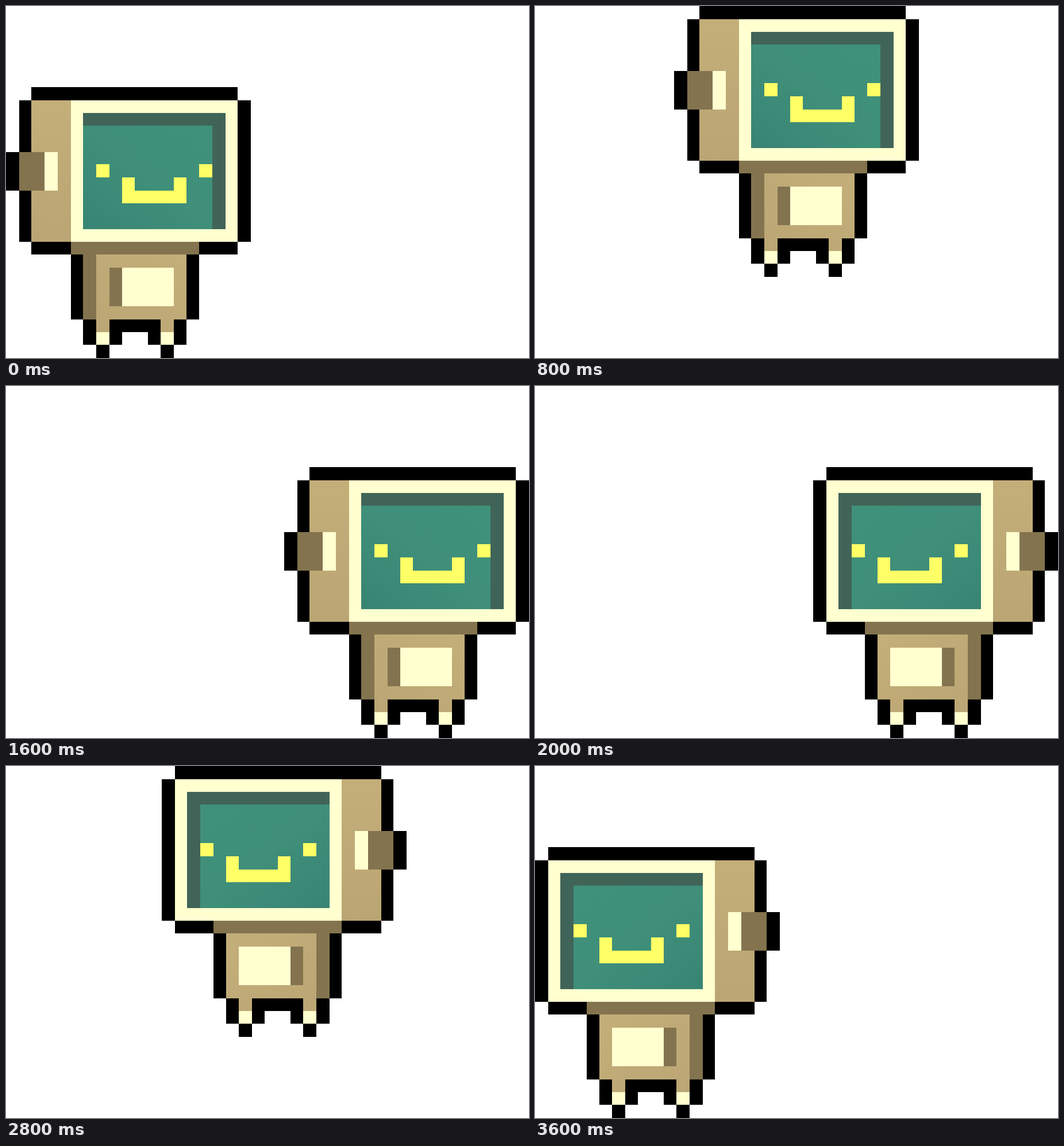
Write an HTML page without scripts that moves like this. It is 910 px wide and 612 px high and loops after 4000 ms.

```html
<!DOCTYPE html>
<html lang="en">
<head>
<meta charset="utf-8">
<title>Hopping pixel robot</title>
<style>
  html, body {
    margin: 0;
    width: 100%;
    height: 100%;
    overflow: hidden;
    background: #fff;
  }
  .robot {
    position: absolute;
    left: 0;
    top: 0;
    width: 426px;
    height: 471px;
    shape-rendering: crispEdges;
    animation: hop 4s step-end infinite;
  }
  .cream { fill: #ffffcf; }
  .brown { fill: #83744f; }
  .shade { fill: #416458; }
  .yellow { fill: #ffff66; }

  /* Two hops right, turn around, two hops back */
  @keyframes hop {
    0%   { transform: translate(0, 141px); }
    10%  { transform: translate(118px, 71px); }
    20%  { transform: translate(242px, 0); }
    30%  { transform: translate(403px, 71px); }
    40%  { transform: translate(484px, 141px); }
    50%  { transform: translate(484px, 141px) scaleX(-1); }
    60%  { transform: translate(426px, 71px) scaleX(-1); }
    70%  { transform: translate(271px, 0) scaleX(-1); }
    80%  { transform: translate(118px, 70px) scaleX(-1); }
    90%, 100% { transform: translate(0, 141px) scaleX(-1); }
  }
</style>
</head>
<body>
<svg class="robot" viewBox="0 0 426 471">
  <defs>
    <linearGradient id="tan" x1="0" y1="0" x2="0" y2="1">
      <stop offset="0" stop-color="#c4ae79"/>
      <stop offset="1" stop-color="#baa574"/>
    </linearGradient>
    <linearGradient id="chest" x1="1" y1="0" x2="0" y2="1">
      <stop offset="0" stop-color="#c4ae79"/>
      <stop offset="1" stop-color="#bba675"/>
    </linearGradient>
    <linearGradient id="glass" x1="1" y1="0" x2="0" y2="1">
      <stop offset="0" stop-color="#40917b"/>
      <stop offset=".5" stop-color="#3f8f7a"/>
      <stop offset="1" stop-color="#388474"/>
    </linearGradient>
  </defs>

  <!-- outline -->
  <path d="M44 0H403V23H44zM23 23H44V269H23zM403 23H426V269H403zM0 113H23V180H0z
           M44 269H113V291H44zM336 269H403V291H336zM113 291H134V404H113zM314 291H336V404H314z
           M134 404H157V448H134zM292 404H314V448H292zM180 404H269V448H247V426H202V448H180z
           M157 448H180V471H157zM269 448H292V471H269z"/>

  <!-- head -->
  <path fill="url(#tan)" d="M44 23H113V269H44z"/>
  <path class="cream" d="M113 23H403V269H113z"/>
  <path class="shade" d="M134 45H382V247H134z"/>
  <path fill="url(#glass)" d="M134 67H359V247H134z"/>
  <path class="yellow" d="M157 134H180V157H157zM336 134H359V157H336zM202 157H224V180H292V157H314V202H202z"/>

  <!-- knob -->
  <path class="brown" d="M23 113H67V180H23z"/>
  <path class="cream" d="M67 113H90V180H67z"/>

  <!-- body and legs -->
  <path class="brown" d="M113 269H336V291H157V404H134V291H113z"/>
  <path fill="url(#chest)" d="M157 291H314V404H292V426H269V404H180V426H157z"/>
  <path class="brown" d="M180 314H202V381H180z"/>
  <path class="cream" d="M202 314H292V381H202zM157 426H180V448H157zM269 426H292V448H269z"/>
</svg>
</body>
</html>
```
